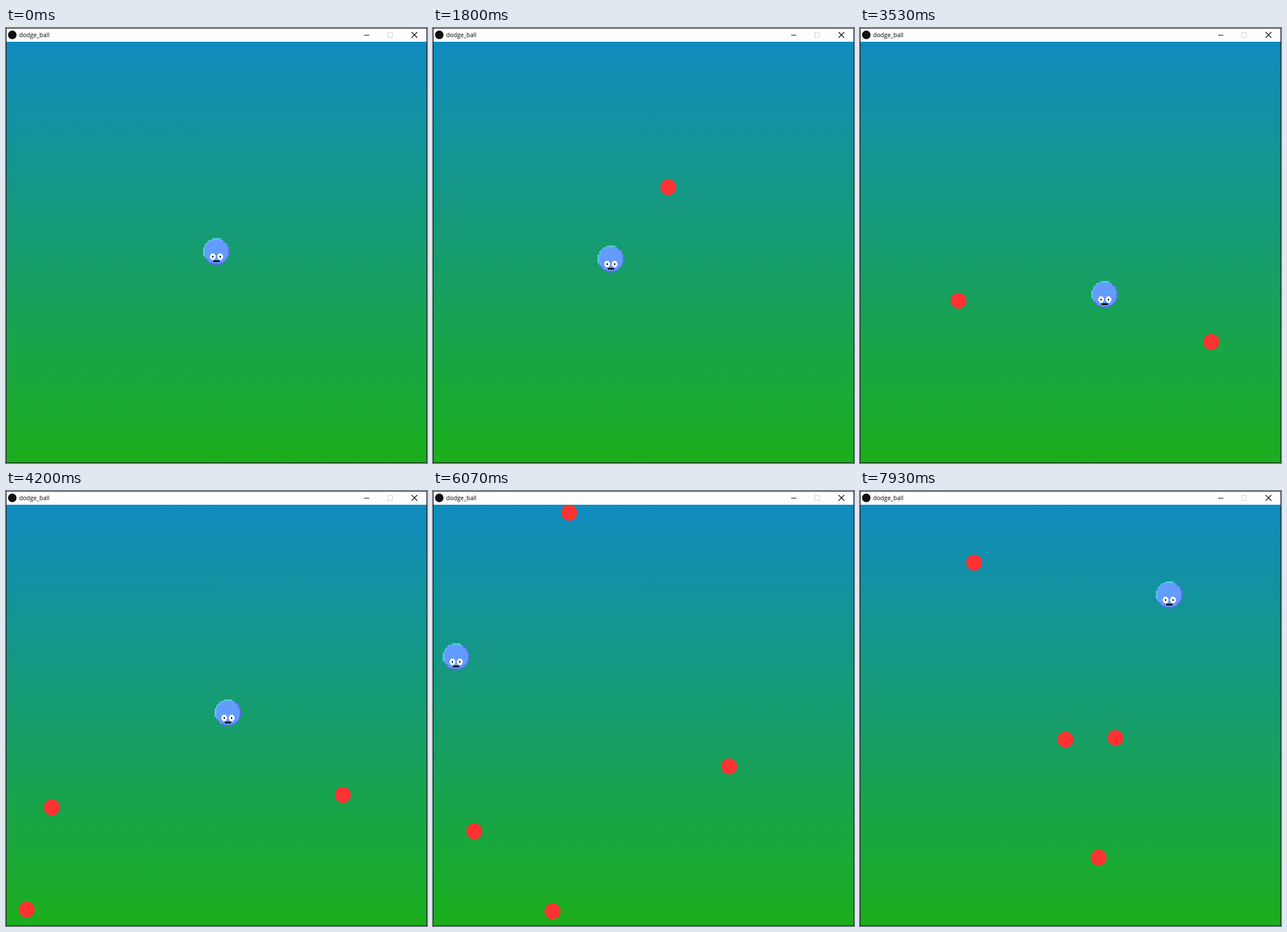
Animation, 737 px wide and 760 px high, one loop 8000 ms. Source, as an HTML page with a canvas:

```html
<!DOCTYPE html>
<html lang="en">
<head>
<meta charset="utf-8">
<title>dodge_ball</title>
<style>
  html, body { margin: 0; width: 100%; height: 100%; overflow: hidden; }
  body { position: relative; background: #fff; }
  .bar { position: absolute; left: 0; top: 0; }
  .bar text { font: 10.5px "Open Sans", "Noto Sans", sans-serif; }
  #field {
    position: absolute; left: 1px; top: 24px;
    background: linear-gradient(rgb(16,139,192), rgb(28,174,28));
  }
  .border { position: absolute; inset: 0; border: 1px solid #1c1c1c; }
</style>
</head>
<body>
<svg class="bar" width="737" height="24">
  <circle cx="11" cy="12" r="7.5" fill="#111"/>
  <text x="23" y="16">dodge_ball</text>
  <g fill="none" stroke="#000">
    <path d="M627 12.5h9"/>
    <path d="M668.5 7.5h8v9h-8z" stroke="#ccc"/>
    <path d="M710 7l10 10m0-10l-10 10" stroke-width="1.2"/>
  </g>
</svg>
<canvas id="field" width="735" height="735"></canvas>
<div class="border"></div>
<script>
const LOOP = 8, FPS = 15, WIDTH = 735, RADIUS = 14;
const LEFT = 14.5, RIGHT = 722, TOP = 38, BOTTOM = 744; // limits for ball centres
const HIT = 5.213; // two balls collide and get new velocities

const ctx = document.getElementById('field').getContext('2d');
ctx.translate(-1, -24); // work in window coordinates

// Seconds, pixels and pixels per second.
const flight = (from, x, y, vx, vy, to = LOOP) => ({ from, to, x, y, vx, vy });
const flights = [
  flight(0.066, 651.5, 79.8, -138.1, 114.4, HIT),
  flight(2, 673.5, 589.5, -38.1, -26.6),
  flight(3.932, 19, 742.5, 65, 52.5, HIT),
  flight(HIT, 88, 668, -154, -85.8),
  flight(HIT, 114, 682.8, 111.7, 60.5),
  flight(5.866, 242.7, 47.5, -20.7, -46.8)
];

// Key positions of the player; x below zero wraps to the right side.
const drift = [
  [0.8, 368.5, 390.5], [1.3, 333, 394], [1.8, 311.5, 403.5], [2.2, 319, 430],
  [2.867, 377.5, 487], [3.5, 428, 468], [4.2, 388, 387], [5, 253.5, 324.5],
  [6.067, 40.5, 289], [6.93, -87, 248], [7.933, -193, 181.5]
];

// Folds straight motion back and forth between two walls.
function bounce(p, min, max) {
  const span = max - min, d = Math.abs(p - min) % (2 * span);
  return min + (d > span ? 2 * span - d : d);
}

function smooth(path, t) {
  let i = 0;
  while (i < path.length - 2 && path[i + 1][0] <= t) i++;
  const a = path[i], b = path[i + 1];
  const before = path[i - 1] || a, after = path[i + 2] || b;
  const span = b[0] - a[0], u = Math.max(0, (t - a[0]) / span);
  return [1, 2].map(k => {
    const m0 = (b[k] - before[k]) / (b[0] - before[0]) * span;
    const m1 = (after[k] - a[k]) / (after[0] - a[0]) * span;
    const d = b[k] - a[k];
    return a[k] + u * (m0 + u * (3 * d - 2 * m0 - m1 + u * (m0 + m1 - 2 * d)));
  });
}

const CELL = 2.6, CELLS = 18, SIZE = 47;

function makePlayer() {
  const sprite = document.createElement('canvas');
  sprite.width = sprite.height = SIZE;
  const g = sprite.getContext('2d');
  // Coordinates are in cells, snapped to whole pixels.
  const box = (color, x, y, w, h) => {
    const [l, t, r, b] = [x, y, x + w, y + h].map(v => Math.round(v * CELL));
    g.fillStyle = color;
    g.fillRect(l, t, r - l, b - t);
  };
  for (let y = 0; y < CELLS; y++) {
    for (let x = 0; x < CELLS; x++) {
      const dx = x + 0.5 - CELLS / 2, dy = y + 0.5 - CELLS / 2;
      const r = Math.hypot(dx, dy);
      if (r > 9.1) continue;
      const rim = dx + dy < -3 ? '#55c8e1' : '#586fe6';
      box(r > 8 ? rim : '#649bff', x, y, 1, 1);
    }
  }
  for (const x of [6, 11]) {
    box('#fff', x - 1.5, 11.5, 4, 2);
    box('#fff', x - 1, 11, 3, 3);
    box('#fff', x - 0.5, 10.5, 2, 4);
    box('#000', x, 12, 1, 1);
  }
  box('#000', 7, 15, 4, 1);
  return sprite;
}

const player = makePlayer();

function draw(time) {
  const t = Math.floor((time + 0.0034) * FPS) / FPS % LOOP;
  ctx.clearRect(0, 0, 737, 760);

  ctx.fillStyle = '#ff3232';
  for (const f of flights) {
    if (t < f.from || t >= f.to) continue;
    const age = t - f.from;
    ctx.beginPath();
    ctx.arc(bounce(f.x + f.vx * age, LEFT, RIGHT),
            bounce(f.y + f.vy * age, TOP, BOTTOM), RADIUS, 0, 2 * Math.PI);
    ctx.fill();
  }

  let [x, y] = smooth(drift, t);
  if (x < 1) x += WIDTH;
  ctx.drawImage(player, Math.round(x - SIZE / 2), Math.round(y - SIZE / 2));
}

const start = performance.now();
function tick() {
  draw((performance.now() - start) / 1000 % LOOP);
  requestAnimationFrame(tick);
}
tick();
</script>
</body>
</html>
```
